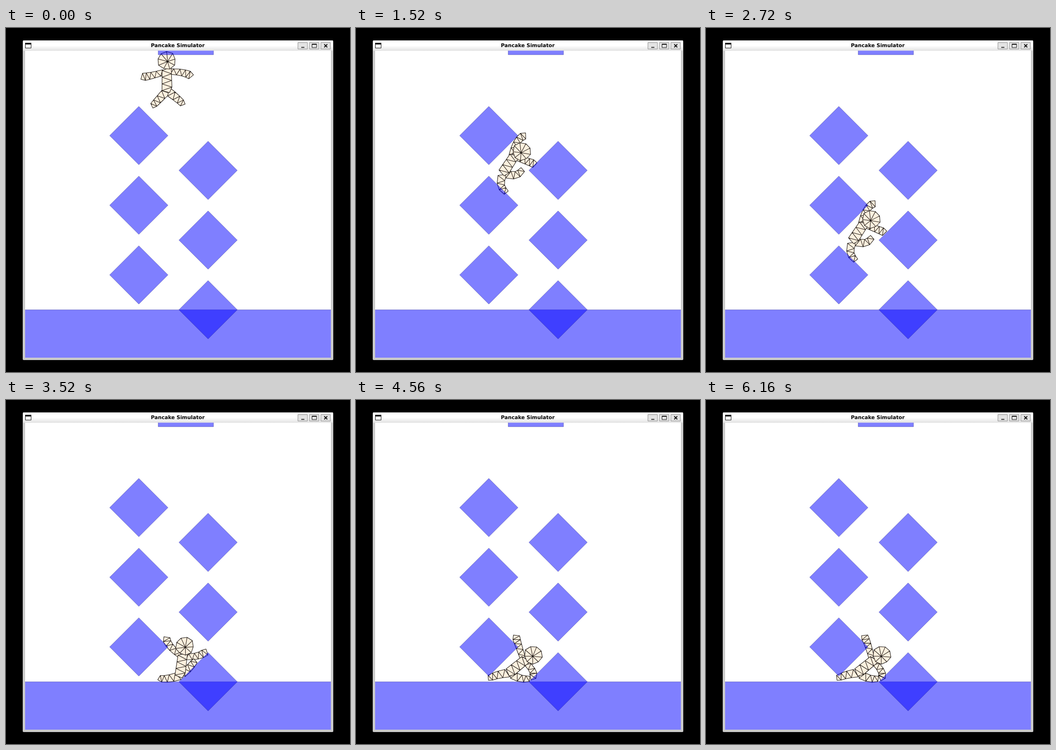
Animation, 720 px wide and 720 px high, one loop 6.24 s. Source, as an HTML page:

```html
<!DOCTYPE html>
<html lang="en">
<head>
<meta charset="utf-8">
<title>Pancake Simulator</title>
<style>
  html, body { margin: 0; width: 100%; height: 100%; overflow: hidden; background: #000; }
  svg { display: block; width: 720px; height: 720px; }
  text { font: bold 10.7px "DejaVu Sans", sans-serif; text-anchor: middle; text-rendering: geometricPrecision; }
  #body path { fill: #fdf0de; stroke: #1c1713; stroke-width: 1.05; stroke-linejoin: round; }
  #blocks path { fill: #00f; fill-opacity: .5; stroke: #00005a; stroke-opacity: .4; stroke-width: .8; }
  .button { fill: #e4e4e4; stroke: #8c8c8c; }
  .icon { fill: none; stroke: #111; }
</style>
</head>
<body>
<svg viewBox="0 0 720 720">
  <defs>
    <linearGradient id="bar" x2="0" y2="1">
      <stop offset=".5" stop-color="#fff"/>
      <stop offset="1" stop-color="#e2e2e2"/>
    </linearGradient>
    <clipPath id="view"><path d="M40 47.5H680V690H40z"/></clipPath>
  </defs>

  <rect x="35" y="26" width="650" height="669" rx="2" fill="#cbcbcb"/>
  <rect x="36" y="26" width="648" height="21.5" fill="url(#bar)"/>
  <path d="M40 47.5H680V690H40z" fill="#fff"/>
  <path d="M40.5 31.5h12v10.5h-12z" class="icon"/>
  <path d="M40 31h13v3.5h-13z" fill="#111"/>
  <text x="359.5" y="40">Pancake Simulator</text>
  <path class="button" d="M611 30.5h20v13.5h-20zM635 30.5h20v13.5h-20zM659 30.5h20v13.5h-20z"/>
  <path class="icon" d="M618 40.5h6.5" stroke-width="1.6"/>
  <path class="icon" d="M640.5 33.5h9.5v7.5h-9.5zM640.5 34.5h9.5"/>
  <path class="icon" d="M666 34l6.5 6.5m0-6.5l-6.5 6.5" stroke-width="1.8"/>

  <g clip-path="url(#view)">
    <g id="body"></g>
    <g id="blocks">
      <path d="M318.5 40H434.3V56H318.5z"/>
      <path d="M30 589.8H690V700H30z"/>
    </g>
  </g>
</svg>

<script>
const NS = 'http://www.w3.org/2000/svg';
const LOOP = 6240, STEP = 80, SETTLED = 4240;
const RADIUS = 61.1, GAP = 3, FLOOR = 583;

function addPath(id) {
  const path = document.createElementNS(NS, 'path');
  document.getElementById(id).append(path);
  return path;
}

const diamonds = Array.from({ length: 6 }, (_, i) => [i % 2 ? 423 : 278, 225.2 + i * 72.9]);
for (const [x, y] of diamonds) {
  const r = RADIUS;
  addPath('blocks').setAttribute('d', `M${x} ${y - r}l${r} ${r} ${-r} ${r} ${-r} ${-r}z`);
}

// Poses: hip position and bone directions in degrees
const pose = (hip, spine, head, leftArm, rightArm, leftLeg, rightLeg) =>
  ({ hip, turns: [spine, head, ...leftArm, ...rightArm, ...leftLeg, ...rightLeg] });

const stand = pose([337, 131], -91, -90, [165, 169], [4, 17], [133, 133], [38, 43]);
const wedge = pose([308, 303], -64, -22, [292, 317], [20, 21], [101, 56], [12, -37]);
const nextWedge = { ...wedge, hip: [307, 445] };
const sit = pose([364, 577], -84, -75, [221, 241], [-2, -24], [165, 180], [-40, -52]);
const slump = pose([318, 571], -42, -27, [250, 255], [50, 75], [169, 160], [27, 3]);

const stages = [
  { at: 0, ...stand }, { at: 400, ...stand },
  { at: 1520, ...wedge }, { at: 2720, ...nextWedge },
  { at: 3520, ...sit }, { at: SETTLED, ...slump }, { at: LOOP, ...slump }
];

const mix = (a, b, t) => a + (b - a) * t;
const blend = (a, b, t) => a.map((v, i) => mix(v, b[i], t));
const smooth = t => t * t * (3 - 2 * t);

function extend([x, y], degrees, length) {
  const angle = degrees * Math.PI / 180;
  return [x + length * Math.cos(angle), y + length * Math.sin(angle)];
}

// Damped rocking once the body rests on the floor
function sway(time) {
  const t = time - SETTLED;
  return t < 0 ? -7 * smooth(Math.max(0, 1 + t / 720))
    : -7 * Math.exp(-t / 700) * Math.cos(t / 900 * 2 * Math.PI);
}

// Keeps a joint outside the diamonds and above the floor
function pushOut([x, y]) {
  for (const [cx, cy] of diamonds) {
    const dx = x - cx, dy = y - cy;
    const depth = RADIUS + GAP - Math.abs(dx) - Math.abs(dy);
    if (depth > 0) {
      x += Math.sign(dx) * depth / 2;
      y += Math.sign(dy) * depth / 2;
    }
  }
  return [x, Math.min(y, FLOOR)];
}

function jointsAt(time) {
  const i = stages.findIndex(stage => stage.at > time);
  const from = stages[i - 1], to = stages[i];
  const t = (time - from.at) / (to.at - from.at);
  // Long falls swing the body round the corner and open the limbs
  const flail = (to.hip[1] - from.hip[1]) / 250 * Math.sin(Math.PI * t);
  const turns = blend(blend(from.turns, to.turns, smooth(t)), stand.turns, flail);
  const hip = blend(from.hip, to.hip, smooth(t));
  hip[0] += 40 * flail + sway(time);

  const chest = extend(hip, turns[0], 40);
  const head = extend(chest, turns[1], 23);
  const joints = [head, chest, hip];
  for (let k = 2; k < turns.length; k += 2) {
    const arm = k < 6;
    const mid = extend(arm ? chest : hip, turns[k], arm ? 30 : 25);
    joints.push(mid, extend(mid, turns[k + 1], arm ? 21 : 18));
  }
  return joints.map(pushOut);
}

const triangle = (...points) =>
  'M' + points.map(p => p[0].toFixed(1) + ' ' + p[1].toFixed(1)).join('L') + 'z';

// Triangle strip along a curve through three points
function strip(a, mid, b, w0, w1, count, tip) {
  const c = [0, 1].map(k => 2 * mid[k] - (a[k] + b[k]) / 2);
  const points = [];
  let dir;
  for (let i = 0; i <= count; i++) {
    const t = i / count;
    const p = blend(blend(a, c, t), blend(c, b, t), t);
    const dx = mix(c[0] - a[0], b[0] - c[0], t), dy = mix(c[1] - a[1], b[1] - c[1], t);
    const len = Math.hypot(dx, dy) || 1;
    const w = mix(w0, w1, t) / (i % 2 ? 2 : -2);
    dir = [dx / len, dy / len];
    points.push([p[0] - dir[1] * w, p[1] + dir[0] * w]);
  }
  const side = points[count - 1], last = points[count];
  points.push([0, 1].map(k => b[k] + dir[k] * tip + (side[k] - last[k]) * .25));
  return points.slice(2).map((p, i) => triangle(points[i], points[i + 1], p)).join('');
}

function headMesh(center, chest) {
  const turn = Math.atan2(center[1] - chest[1], center[0] - chest[0]) * 180 / Math.PI;
  const rim = Array.from({ length: 9 }, (_, i) =>
    extend(center, turn + i * 40, 18.8 + Math.sin(i * 2.3)));
  const hub = extend(center, turn + 140, 3);
  return rim.map((p, i) => triangle(hub, p, rim[(i + 1) % 9])).join('');
}

const parts = Array.from({ length: 6 }, () => addPath('body'));

function draw(time) {
  const joints = jointsAt(time);
  const [head, chest, hip] = joints;
  const limbs = [3, 5, 7, 9].map(i => i < 7
    ? strip(chest, joints[i], joints[i + 1], 11, 16, 9, 6)
    : strip(hip, joints[i], joints[i + 1], 17, 13, 7, 5));
  const neck = blend(chest, head, .4);
  const torso = strip(neck, blend(neck, hip, .5), hip, 19, 21, 7, 6);
  [...limbs, torso, headMesh(head, chest)].forEach((d, i) => parts[i].setAttribute('d', d));
}

function tick() {
  const time = performance.now() % LOOP;
  draw(Math.floor(time / STEP) * STEP);
  requestAnimationFrame(tick);
}
tick();
</script>
</body>
</html>
```
